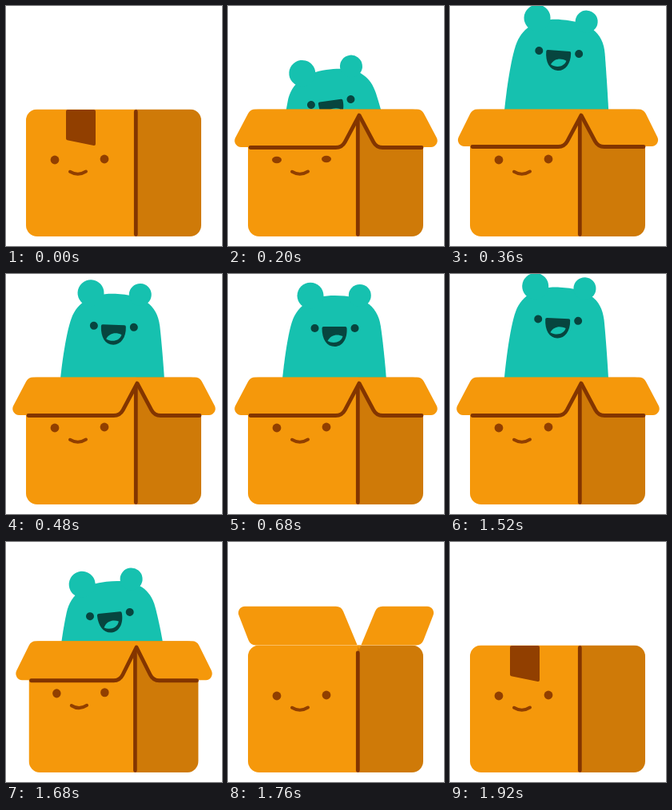
Animation of 270x301 px, one loop 2880 ms. Source, as an HTML page with a canvas:

```html
<!DOCTYPE html>
<html lang="en">
<head>
<meta charset="utf-8">
<title>Bear in a box</title>
<style>
html, body { margin: 0; width: 100%; height: 100%; overflow: hidden; background: #fff; }
canvas { display: block; width: 270px; height: 301px; }
</style>
</head>
<body>
<canvas id="stage"></canvas>
<script>
const W = 270, H = 301, LOOP = 2880, STEP = 40;
const FRONT = '#f5980b', SIDE = '#cf7a08', LINE = '#833500', TAPE = '#913f00';
const BEAR = '#16c1af', DARK = '#07453f';
const TOP = 129.5;

const canvas = document.getElementById('stage');
const ctx = canvas.getContext('2d');
const dpr = window.devicePixelRatio || 1;
canvas.width = W * dpr;
canvas.height = H * dpr;

const progress = (t, from, to) => Math.min(1, Math.max(0, (t - from) / (to - from)));

// One hump, from 0 up to 1 and back.
const pulse = (t, from, to) => Math.sin(Math.PI * progress(t, from, to));

// Damped swing that comes fully to rest after 580 ms.
function spring(ms, damping) {
  const u = Math.max(0, ms);
  return Math.exp(-damping * u) * Math.cos(.0095 * u) * (1 - progress(u, 0, 580));
}

// Pulls back a little before speeding off.
const windUp = u => u ** 3 * (3.66 * u - 2.66);

function bearPose(t) {
  const leave = windUp(Math.max(0, (t - 1280) / 480));
  const tilt = -22.3 * spring(t - 100, .0029) - 27 * leave;
  return {
    x: 133.5 + .6 * tilt,
    y: 68 + 288 * spring(t - 100, .0097) + 100 * leave,
    tilt
  };
}

function boxPose(t) {
  const open = progress(t, 80, 200) - progress(t, 1680, 1800);
  const rebound = pulse(t, 240, 480);
  return {
    open,
    // The flaps swing up, over and down.
    drop: -49.4 * Math.sin(1.6 * Math.PI * open) - rebound,
    spread: 25 * open + 12 * Math.sin(Math.PI * open) - 2 * rebound,
    blink: 1 - .25 * pulse(t, 120, 240),
    width: 1 + .045 * pulse(t, 0, 120) - .03 * pulse(t, 100, 200)
      - .032 * pulse(t, 1600, 1760) + .03 * pulse(t, 1760, 1920)
  };
}

function ellipse(x, y, rx, ry, color) {
  ctx.fillStyle = color;
  ctx.beginPath();
  ctx.ellipse(x, y, rx, ry, 0, 0, Math.PI * 2);
  ctx.fill();
}

function stroke(width, color) {
  ctx.strokeStyle = color;
  ctx.lineWidth = width;
  ctx.lineCap = ctx.lineJoin = 'round';
  ctx.stroke();
}

function drawBear({ x, y, tilt }) {
  if (y > 165) return;
  const a = tilt * Math.PI / 180, c = Math.cos(a), s = Math.sin(a);
  const at = (px, py) => [x + px * c - py * s, y + px * s + py * c];
  const base = Math.max(150, y + 45);
  const lift = base - (base - y) * .3;

  // The base stays put while the head leans.
  ctx.fillStyle = BEAR;
  ctx.beginPath();
  ctx.moveTo(66.5, base);
  ctx.bezierCurveTo(68, lift, ...at(-60, 12), ...at(-53.5, -8));
  ctx.bezierCurveTo(...at(-46, -31), ...at(-26, -41), ...at(0, -41));
  ctx.bezierCurveTo(...at(34, -41), ...at(53, -30), ...at(57.3, -3));
  ctx.bezierCurveTo(...at(60, 14), 198, lift, 199, base);
  ctx.fill();

  ctx.save();
  ctx.translate(x, y);
  ctx.rotate(a);
  ellipse(-30.5, -40.8, 16.5, 16.5, BEAR);
  ellipse(31.3, -41, 14, 14, BEAR);
  ellipse(-25, 0, 5, 5, DARK);
  ellipse(25, 0, 5, 5, DARK);
  ctx.beginPath();
  ctx.moveTo(-14, -2);
  ctx.lineTo(13, -2);
  ctx.quadraticCurveTo(15, -2, 15, 0);
  ctx.bezierCurveTo(16, 14, 9, 23, 0, 23);
  ctx.bezierCurveTo(-10, 23, -16, 14, -16, 0);
  ctx.quadraticCurveTo(-16, -2, -14, -2);
  ctx.fill();
  ctx.fillStyle = BEAR;
  ctx.beginPath();
  ctx.moveTo(-9, 16);
  ctx.bezierCurveTo(-5, 8, 3, 7, 10, 10);
  ctx.bezierCurveTo(8, 18, -2, 20, -9, 16);
  ctx.fill();
  ctx.restore();
}

function drawFlaps(drop, spread) {
  const edge = 130 + drop, inner = 21.5 * Math.abs(drop) / 47;
  const r = Math.min(10, Math.abs(drop) / 3);
  ctx.fillStyle = FRONT;
  ctx.beginPath();
  ctx.moveTo(135, TOP);
  ctx.arcTo(242, TOP, 242 + spread, edge, r);
  ctx.arcTo(242 + spread, edge, 164 + inner, edge, r * .8);
  ctx.arcTo(164 + inner, edge, 164, 135, r);
  ctx.lineTo(164, 135);
  ctx.arcTo(164 - inner, edge, 28 - spread, edge, r);
  ctx.arcTo(28 - spread, edge, 28, TOP, r * .8);
  ctx.arcTo(28, TOP, 135, TOP, r);
  ctx.fill();
  if (drop < 10) return;
  ctx.beginPath();
  ctx.moveTo(28, edge + .5);
  ctx.arcTo(164 - inner, edge + .5, 164, 137, r * 1.3);
  ctx.lineTo(164, 137);
  ctx.arcTo(164 + inner, edge + .5, 242, edge + .5, r * 1.3);
  ctx.lineTo(242, edge + .5);
  stroke(4.8, LINE);
}

function drawBox({ open, drop, spread, blink, width }) {
  ctx.save();
  ctx.translate(135, 289);
  ctx.scale(width, 1 / width);
  ctx.translate(-135, -289);

  ctx.save();
  ctx.beginPath();
  ctx.roundRect(25, TOP, 219, 289 - TOP, 14);
  ctx.clip();
  ctx.fillStyle = FRONT;
  ctx.fillRect(25, TOP, 138, 160);
  ctx.fillStyle = SIDE;
  ctx.fillRect(162.3, TOP, 82, 160);
  ctx.restore();

  if (!open) {
    ctx.fillStyle = TAPE;
    ctx.beginPath();
    ctx.moveTo(77, 130);
    ctx.arcTo(112, 130, 112, 175.5, 2);
    ctx.arcTo(112, 175.5, 75, 168, 2);
    ctx.arcTo(75, 168, 75, 130, 2);
    ctx.arcTo(75, 130, 77, 130, 2);
    ctx.fill();
  }

  ctx.beginPath();
  ctx.moveTo(162.3, open ? 139 : 132.5);
  ctx.lineTo(162.3, 286.5);
  stroke(4.8, LINE);
  if (open) drawFlaps(drop, spread);

  const eyeWidth = 5.4 * (1.5 - .5 * blink), eyeHeight = 5.4 * blink;
  ellipse(61, 193, eyeWidth, eyeHeight, TAPE);
  ellipse(123, 192, eyeWidth, eyeHeight, TAPE);
  ctx.beginPath();
  ctx.moveTo(80, 207.8);
  ctx.quadraticCurveTo(90, 213.8, 100, 207.5);
  stroke(4, TAPE);
  ctx.restore();
}

function draw(time) {
  const t = Math.floor(time % LOOP / STEP) * STEP;
  ctx.setTransform(dpr, 0, 0, dpr, 0, 0);
  ctx.fillStyle = '#fff';
  ctx.fillRect(0, 0, W, H);
  drawBear(bearPose(t));
  drawBox(boxPose(t));
}

const start = performance.now();
function tick() {
  draw(performance.now() - start);
  requestAnimationFrame(tick);
}
tick();
</script>
</body>
</html>
```
